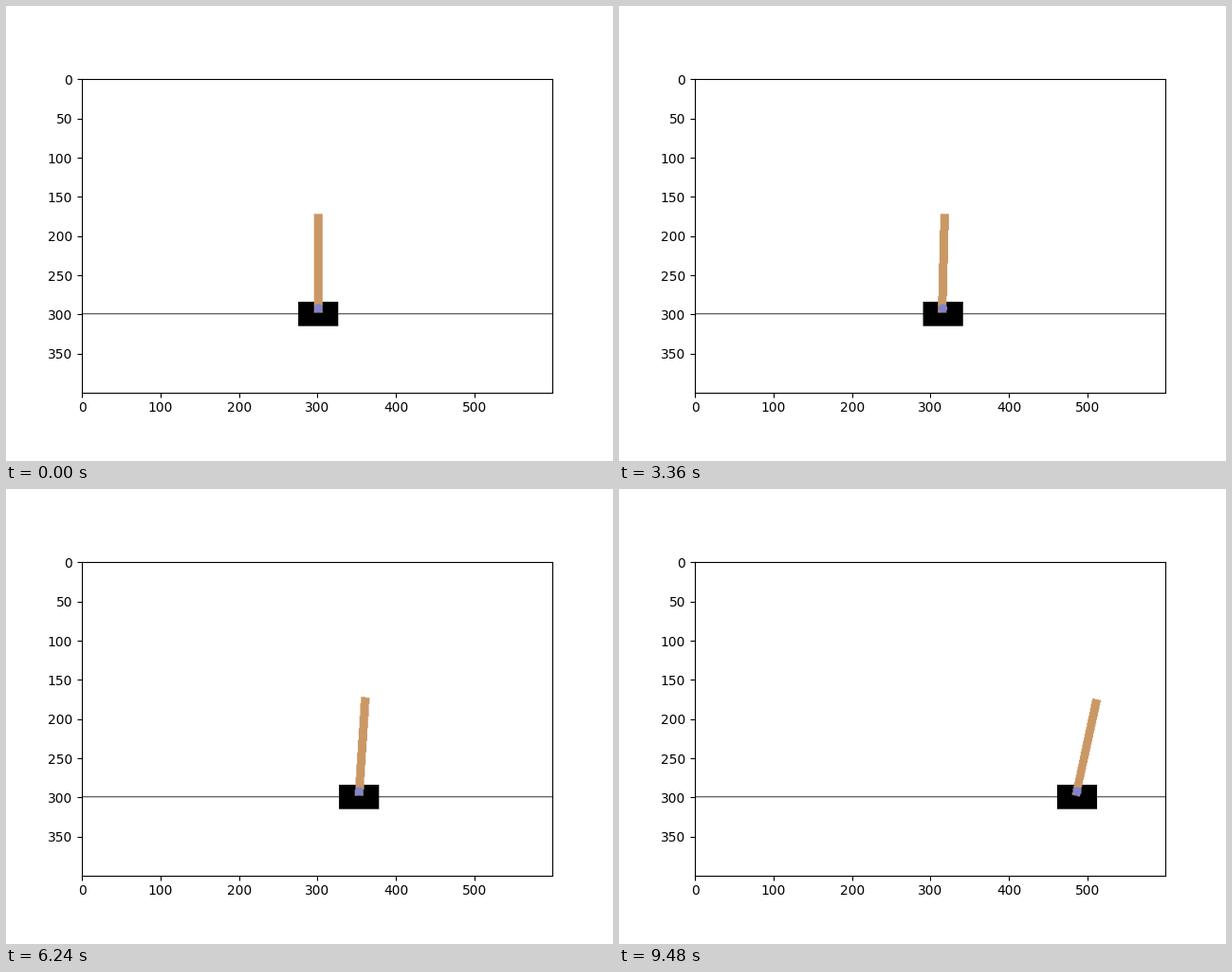
These frames come from a looping animation (640x480 px, 9.54 s). A matplotlib script:

```python
import numpy as np
import matplotlib.pyplot as plt
from matplotlib.animation import FuncAnimation

WIDTH, HEIGHT = 600, 400
FRAMES, INTERVAL = 159, 60
POLE = (202, 152, 101)
AXLE = (129, 132, 203)
CART_Y, AXLE_Y = 100, 107.5

ROWS, COLS = np.mgrid[:HEIGHT, :WIDTH]
UP = HEIGHT - 1 - ROWS


def pole_tilt(u):
    """Angle in radians: a slow lean that turns into a fall."""
    return 0.047 * u + 0.167 * u ** 4


def cart_x(u):
    """The cart drifts off, then speeds up to chase the falling pole."""
    drift = 22.6 * (1 - np.exp(-5.5 * u ** 2.1))
    chase = 92 * u ** 3 + 71.2 * u ** 6
    return 301.3 + drift + chase


def polygon_mask(points):
    """Pixels inside a convex clockwise polygon, its border included."""
    mask = np.ones((HEIGHT, WIDTH), bool)
    for (x0, y0), (x1, y1) in zip(points, np.roll(points, -1, axis=0)):
        dx, dy = x1 - x0, y1 - y0
        outside = (dx * (UP - y0) - dy * (COLS - x0)) / np.hypot(dx, dy)
        mask &= outside <= 0.5
    return mask


def render(n):
    u = n / (FRAMES - 1)
    x, tilt = cart_x(u), pole_tilt(u)
    cx = int(x)
    image = np.full((HEIGHT, WIDTH, 3), 255, np.uint8)
    image[HEIGHT - 1 - CART_Y] = 0
    image[284:315, cx - 25:cx + 26] = 0

    c, s = np.cos(tilt), np.sin(tilt)
    corners = [(-5, -5), (-5, 120), (5, 120), (5, -5)]
    pole = np.floor([(x + a * c + b * s, AXLE_Y - a * s + b * c)
                     for a, b in corners])
    image[polygon_mask(pole)] = POLE
    image[(COLS - cx) ** 2 + (UP - int(AXLE_Y)) ** 2 <= 32] = AXLE
    return image


fig, ax = plt.subplots(figsize=(6.4, 4.8), dpi=100)
picture = ax.imshow(render(0))


def update(n):
    picture.set_data(render(n))
    return [picture]


animation = FuncAnimation(fig, update, frames=FRAMES, interval=INTERVAL,
                          repeat=True, repeat_delay=0)
plt.show()
```
